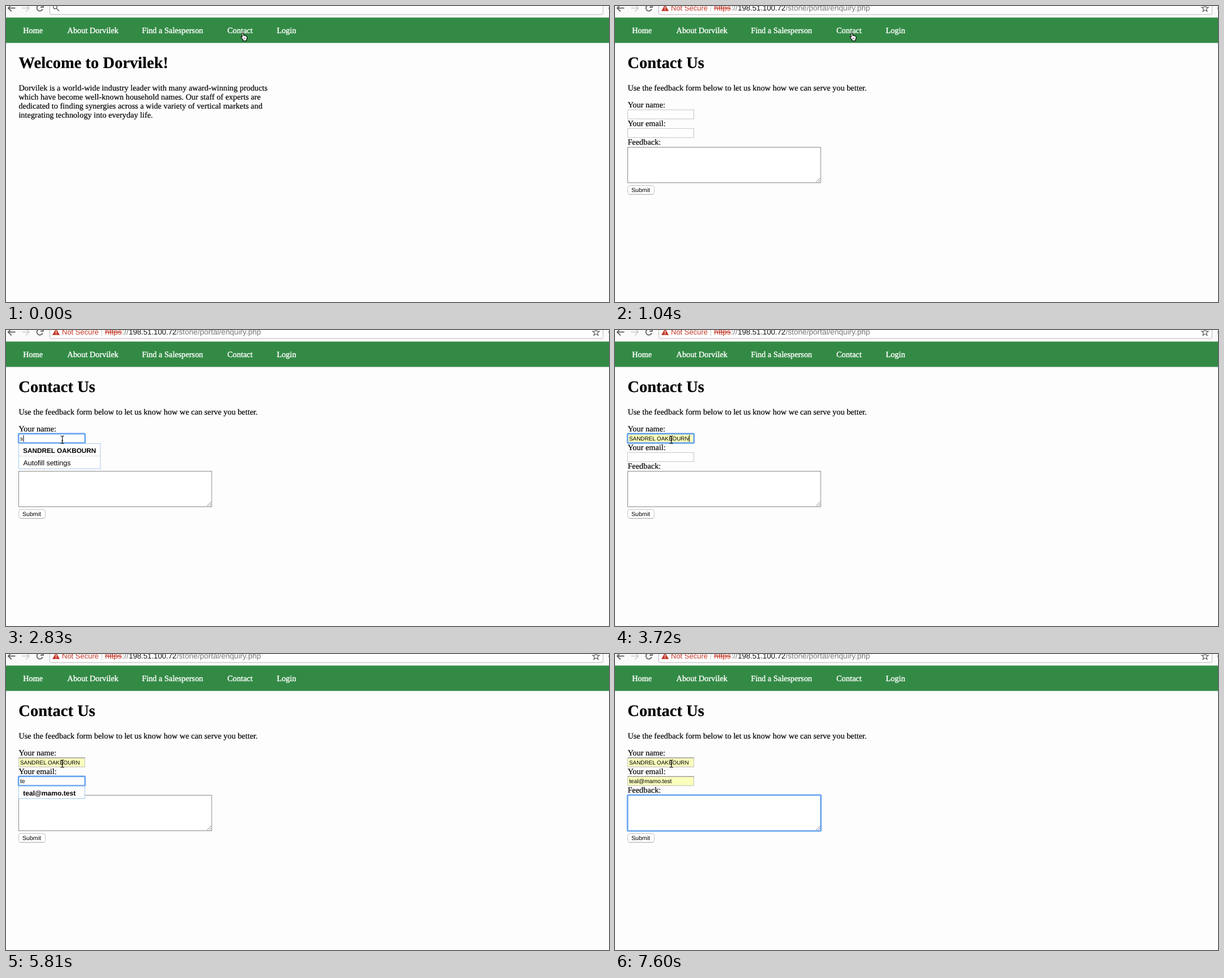
An HTML page for the animation above (8 s loop, 1067 px wide and 525 px high).

```html
<!DOCTYPE html>
<html lang="en">
<head>
<meta charset="utf-8">
<title>Contact form</title>
<style>
  @property --t { syntax: "<integer>"; inherits: true; initial-value: 0; }
  @keyframes clock { from { --t: 0; } to { --t: 8000; } }

  html, body { margin: 0; width: 100%; height: 100%; overflow: hidden; background: #fdfdfd; }
  svg { display: block; width: 1067px; height: 525px; animation: clock 8s linear infinite; }

  /* Visible from --a up to --b, in ms */
  .s {
    --a: 0; --b: 8000;
    opacity: calc(clamp(0, var(--t) - var(--a) + 1, 1) * clamp(0, var(--b) - var(--t), 1));
  }

  text {
    font: 14.33px "Liberation Serif", "Times New Roman", serif;
    text-rendering: geometricPrecision; white-space: pre;
    stroke: #000; stroke-width: .2px;
  }
  .h1 { font-size: 28.55px; font-weight: bold; }
  .nav text { fill: #fff; stroke: #fff; stroke-width: .4px; }
  .ui text, text.ui { font-family: "Liberation Sans", Arial, sans-serif; stroke: none; }
  .url text { font-size: 13.65px; fill: #777; }
  .url .warn { font-size: 13px; fill: #c53929; }
  .url .struck { fill: #c53929; text-decoration: line-through; }
  .url .host { font-size: 13.2px; fill: #111; }
  .val { font-size: 9.9px; }
  .mail { font-size: 10.35px; }
  .pick { font-size: 11.75px; font-weight: bold; }
  .pick.mail { font-size: 12.1px; }
  .opt { font-size: 12.5px; }
  .line { fill: none; stroke: #5a5a5a; stroke-width: 1.7; }
  .box { fill: #fff; stroke: #c3c3c3; }
  .area { fill: #fff; stroke: #8a8a8a; }
  .menu { fill: #fff; stroke: #a3c9ee; }
  .hot { fill: #b2d7fe; }
  .caret { fill: #000; }
  .glow rect { fill: none; }
  .glow rect:first-child { stroke: #5b9ff5; stroke-opacity: .4; stroke-width: 3.6; }
  .glow rect:last-child { stroke: #5f9ff0; stroke-width: 1.8; }
</style>
</head>
<body>
<svg viewBox="0 0 1067 525">
  <defs>
    <rect id="field" class="box" x="22.5" y=".5" width="117" height="16"/>
    <g id="filled">
      <rect x="22.5" y=".5" width="117" height="16" fill="#faffbd" stroke="#c3c3c3"/>
      <path d="M22 .5H140" stroke="#8c8c8c"/>
    </g>
    <g id="ring" class="glow">
      <rect x="22.2" y=".2" width="117.6" height="16.6" rx="1.5"/>
      <rect x="22.2" y=".2" width="117.6" height="16.6" rx="1"/>
    </g>
    <rect id="caret" class="caret" width="1" height="12"/>
    <g id="hand">
      <path d="M2.6 1.6Q3.9 0 5.2 1.6V5Q6.3 4.4 7.2 5.5Q8.4 5 9.2 6.1Q11.2 5.8 11.2 8V10.3L10 12.8V14.5H4.2V12.8L.8 8.8Q.1 7 1.6 6.9L2.6 7.8Z" fill="#fff" stroke="#000" stroke-width="1.1"/>
      <path d="M5.6 9V12M7.4 9V12" stroke="#000" stroke-width=".6"/>
    </g>
    <path id="arrow" d="M.7 1V14.2L3.7 11.4 5.8 16.3 8 15.4 6 10.6H10.3Z" fill="#000" stroke="#fff" stroke-width=".9"/>
    <path id="beam" d="M-3 .8Q-.4 .8 0 2.2Q.4 .8 3 .8M0 2V13M-3 14.2Q-.4 14.2 0 12.8Q.4 14.2 3 14.2M-1.6 9H1.6" fill="none" stroke="#111" stroke-width="1.2"/>
  </defs>

  <rect width="1067" height="525" fill="#fdfdfd"/>

  <!-- Toolbar -->
  <g class="ui">
    <rect width="1067" height="20.5" fill="#fafafa"/>
    <path class="line" d="M16.5 3.7H4M9.8 -2.3L3.8 3.7 9.8 9.7"/>
    <path class="line" d="M28.5 3.7H41M35.2 -2.3L41.2 3.7 35.2 9.7" style="stroke:#cfcfcf"/>
    <g class="s" style="--b:750"><path id="reload" class="line" d="M64.8 5.4A5.2 5.2 0 1 1 63.8 .2M66 -3V2.2H61"/></g>
    <path class="line s" style="--a:750;--b:890" d="M55.5 -.8L64.5 8.2M64.5 -.8L55.5 8.2"/>
    <use href="#reload" class="s" style="--a:890"/>
    <rect x="77.5" y="-10" width="979" height="25" rx="2.5" fill="#fff" stroke="#b8b8b8"/>
    <path d="M1067 2A2.5 2.5 0 0 0 1067 6" fill="#777"/>
    <g class="s" style="--b:890">
      <path class="line" style="stroke-width:1.4" d="M90.2 1.8A3.2 3.2 0 1 1 83.8 1.8A3.2 3.2 0 1 1 90.2 1.8M89.3 4.2L94 9"/>
    </g>
    <g class="s url" style="--a:890">
      <path d="M88.6 -2.5L95.2 9H82Z" fill="#c53929"/>
      <path d="M88.6 1.2V5M88.6 6.2V7.7" stroke="#fff" stroke-width="1.3"/>
      <text class="warn" x="99" y="8">Not Secure</text>
      <path d="M169.5 -2V11" stroke="#c9c9c9"/>
      <text class="struck" x="175.3" y="8">https</text>
      <text x="205.5" y="8">://</text>
      <text class="host" x="217.3" y="8">198.51.100.72</text>
      <text x="302" y="8">/stone/portal/enquiry.php</text>
      <path class="line" style="stroke-width:1.2" d="M1044 -2L1045.6 2.2 1050 2.4 1046.6 5.2 1047.8 9.6 1044 7.1 1040.2 9.6 1041.4 5.2 1038 2.4 1042.4 2.2Z"/>
    </g>
  </g>

  <!-- Navigation -->
  <g class="nav">
    <rect y="20.5" width="1067" height="45" fill="#338a45"/>
    <text x="30.2" y="48.2">Home</text>
    <text x="108.6" y="48.2">About Dorvilek</text>
    <text x="240.5" y="48.2">Find a Salesperson</text>
    <text x="391.8" y="48.2">Contact</text>
    <text x="479.2" y="48.2">Login</text>
  </g>

  <!-- Home page -->
  <g class="s" style="--b:1040">
    <text class="h1" x="22.5" y="110">Welcome to Dorvilek!</text>
    <text x="22.4" y="149.6">Dorvilek is a world-wide industry leader with many award-winning products</text>
    <text x="22.4" y="165.7">which have become well-known household names. Our staff of experts are</text>
    <text x="22.4" y="181.8">dedicated to finding synergies across a wide variety of vertical markets and</text>
    <text x="22.4" y="197.9">integrating technology into everyday life.</text>
  </g>

  <!-- Contact page -->
  <g class="s" style="--a:1040">
    <text class="h1" x="22.3" y="110">Contact Us</text>
    <text x="22.4" y="149.6">Use the feedback form below to let us know how we can serve you better.</text>
    <text x="22.4" y="179.8">Your name:</text>
    <text x="22.4" y="213.1">Your email:</text>
    <text x="22.4" y="246.2">Feedback:</text>
    <use href="#field" y="183.7"/>
    <use href="#field" y="216.8"/>
    <rect class="area" x="22.5" y="250.5" width="341.5" height="63"/>
    <path d="M355.5 312.5L363 305M359.5 312.5L363 309" stroke="#777" stroke-width=".9"/>
    <rect x="22.5" y="318.5" width="47" height="15.5" rx="3.5" fill="#fff" stroke="#c2c2c2"/>
    <path d="M25 334.2H67" stroke="#aaa" stroke-width=".7"/>
    <text class="ui" x="29" y="329.8" style="font-size:10.6px">Submit</text>
  </g>

  <!-- Name field -->
  <g class="ui">
    <use href="#filled" y="183.7" class="s" style="--a:3270"/>
    <use href="#ring" y="183.7" class="s" style="--a:2380;--b:4010"/>
    <use href="#caret" x="25" y="186.5" class="s" style="--a:2380;--b:2830"/>
    <g class="s" style="--a:2830;--b:3270">
      <text class="val" x="25" y="196">s</text>
      <use href="#caret" x="30.5" y="186.5"/>
    </g>
    <text class="val s" style="--a:3270" x="25" y="196">SANDREL OAKBOURN</text>
    <use href="#caret" x="131" y="186.5" class="s" style="--a:3720;--b:4010"/>
    <g class="s" style="--a:2830;--b:3720">
      <rect class="menu" x="22.5" y="201.5" width="144.5" height="44.5"/>
      <rect class="hot s" style="--a:3270" x="23" y="202" width="143.5" height="21"/>
      <path d="M23 223.5H166.5" stroke="#dedede"/>
      <text class="pick" x="30.2" y="217.6">SANDREL OAKBOURN</text>
      <text class="opt" x="30.4" y="240.3">Autofill settings</text>
    </g>
  </g>

  <!-- Email field -->
  <g class="ui">
    <use href="#filled" y="216.8" class="s" style="--a:6260"/>
    <use href="#ring" y="216.8" class="s" style="--a:4010;--b:7000"/>
    <use href="#caret" x="25" y="219" class="s" style="--a:4010;--b:4460"/>
    <g class="s" style="--a:5060;--b:5210">
      <text class="mail" x="25" y="229.3">t</text>
      <use href="#caret" x="28" y="219"/>
      <rect class="menu" x="22.5" y="234.5" width="139" height="45"/>
      <text class="pick mail" x="30.2" y="273.3">tomasina@gorvel.test</text>
    </g>
    <text class="mail s" style="--a:5210;--b:6260" x="25" y="229.3">te</text>
    <use href="#caret" x="34" y="219" class="s" style="--a:5210;--b:5810"/>
    <g class="s" style="--a:5210;--b:6550">
      <rect class="menu" x="22.5" y="234.5" width="117" height="22"/>
      <rect class="hot s" style="--a:6260" x="23" y="235" width="116" height="21"/>
    </g>
    <text class="pick mail s" style="--a:5060;--b:6550" x="30.2" y="250.8">teal@mamo.test</text>
    <text class="mail s" style="--a:6260" x="25" y="229.3">teal@mamo.test</text>
    <use href="#caret" x="100.3" y="219" class="s" style="--a:6550;--b:7000"/>
  </g>

  <!-- Feedback field -->
  <g class="glow s" style="--a:7000">
    <rect x="22.2" y="250.2" width="342.2" height="63.6" rx="1.5"/>
    <rect x="22.2" y="250.2" width="342.2" height="63.6" rx="1"/>
  </g>
  <use href="#caret" x="25" y="252.5" class="s" style="--a:7000;--b:7600"/>

  <!-- Pointer -->
  <use href="#hand" x="415.3" y="47.2" class="s" style="--b:1490"/>
  <use href="#hand" x="406" y="52" class="s" style="--a:1490;--b:1640"/>
  <use href="#arrow" x="231" y="211" class="s" style="--a:1640;--b:1790"/>
  <use href="#arrow" x="156" y="233" class="s" style="--a:1790;--b:1930"/>
  <use href="#arrow" x="107" y="207" class="s" style="--a:1930;--b:2080"/>
  <use href="#beam" x="103.5" y="190.5" class="s" style="--a:2080;--b:2230"/>
  <use href="#beam" x="99.7" y="187" class="s" style="--a:2230"/>
</svg>
</body>
</html>
```
